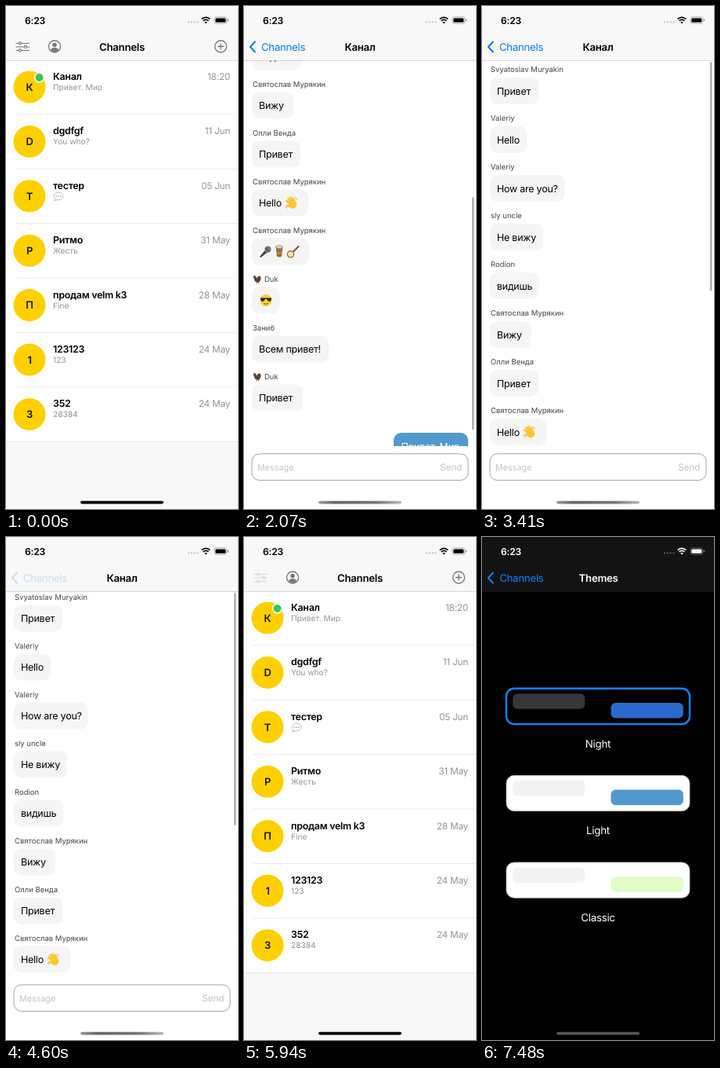
Write an HTML page that moves like this. It is 296 px wide and 640 px high and loops after 8 s.

```html
<!DOCTYPE html>
<html lang="en">
<head>
<meta charset="utf-8">
<title>Messenger</title>
<style>
  html, body { margin: 0; height: 100%; overflow: hidden; background: #fff; }
  svg {
    --fg: #000; --bar: #f8f8f8; --bg: #fff; --blue: #007aff; --dots: #c4c4c6; --line: #c8c8c8;
    display: block; width: 100vw; height: 100vh;
    font-family: Inter, sans-serif; text-rendering: geometricPrecision;
  }
  svg.dark { --fg: #fff; --bar: #131314; --bg: #000; --blue: #0a84ff; --dots: #5a5a5c; --line: #1c1c1e; }
  .card { stroke: #aaa; stroke-width: .8; }
  svg.dark #card0, svg:not(.dark) #card1 { stroke: var(--blue); stroke-width: 2.4; }
</style>
</head>
<body>
<svg id="stage" viewBox="0 0 296 640" preserveAspectRatio="none">
  <defs>
    <clipPath id="view"><rect y="69" width="296" height="491"/></clipPath>
    <linearGradient id="fade">
      <stop stop-color="#999"/><stop offset=".2" stop-color="#666"/>
      <stop offset=".7" stop-color="#777"/><stop offset="1" stop-color="#bbb"/>
    </linearGradient>
  </defs>
  <g id="list"></g>
  <g id="chat"></g>
  <g id="themes"></g>
  <g id="bar"></g>
</svg>
<script>
const $ = id => document.getElementById(id);
const text = (x, y, size, str, fill = 'var(--fg)', attrs = '') =>
  `<text x="${x}" y="${y}" font-size="${size}" fill="${fill}" letter-spacing="${size > 11 ? '-.02em' : 0}" ${attrs}>${str}</text>`;
const rect = (x, y, w, h, r, fill, attrs = '') =>
  `<rect x="${x}" y="${y}" width="${w}" height="${h}" rx="${r}" fill="${fill}" ${attrs}/>`;
const at = (x, y, body) => `<g transform="translate(${x} ${y})">${body}</g>`;
const BOLD = 'font-weight="600"', MID = 'text-anchor="middle"', END = 'text-anchor="end"';

const emoji = {
  hand: `<g transform="rotate(-22)" stroke="#ffc52e" stroke-width="2.7" stroke-linecap="round">
    <path d="M-2 0L-4.5-4.5M0-1L-1.2-6.5M2.5-1L2-6.5M4.6 1L5-4M-2 4L-6 1.5"/><ellipse cx="1.3" cy="2.6" rx="3.6" ry="4" fill="#ffc52e"/></g>
    <path d="M5-7q2 1 2.5 3M-7 4q.5 2 2.5 3" fill="none" stroke="#a99" stroke-width=".8"/>`,
  mic: `<path d="M-7 6.5L1-3 4 0-5.5 7.5Z" fill="#444"/><circle cx="3.5" cy="-3" r="4" fill="#777"/><path d="M.5-4.5l5 5" stroke="#333"/>`,
  drum: `<path d="M-4.5-6L-3 6.5Q0 8 3 6.5L4.5-6Z" fill="#b5803f"/><path d="M-4-2Q0 0 4-2M-3.3 4Q0 6 3.3 4" fill="none" stroke="#654" stroke-width="1.2"/>
    <ellipse cy="-6" rx="4.5" ry="1.8" fill="#eadfc8" stroke="#765" stroke-width=".7"/>`,
  banjo: `<path d="M-3 3L6.5-6.5" stroke="#7a4a22" stroke-width="1.8" stroke-linecap="round"/><circle cx="-3.5" cy="3.3" r="4.2" fill="#f0dfbd" stroke="#9a6a35" stroke-width="1.2"/>`,
  cool: `<circle r="7.5" fill="#ffcc2f"/><path d="M-7.2-3H7.2L6 1Q3 2.5 1-1.5H-1Q-3 2.5-6 1Z" fill="#222"/><path d="M-3 3.8Q0 6 3 3.8" fill="none" stroke="#8a5a10"/>`,
  bird: `<path d="M-5-4Q-2-6-1-1Q2-6 4.5-3Q5 3 1 4.5Q-4 4-4-1Z" fill="#5a4438"/><path d="M-5-3.5l1 3.5M-1 4.5v1.5M1.5 4.5v1.5" stroke="#a65"/>`,
  talk: `<path d="M-4 3.5L-5.5 6-1 4.5" fill="#fff" stroke="#aaa" stroke-width=".7"/><ellipse rx="6" ry="4.8" fill="#fff" stroke="#aaa" stroke-width=".7"/>
    <path d="M-2.8 0h0M0 0h0M2.8 0h0" stroke="#777" stroke-width="1.4" stroke-linecap="round"/>`
};

// Channel list
const ROW = 69.4, GRAY = '#949498';
const channels = [
  ['К', 'Канал', 'Привет. Мир', '18:20'], ['D', 'dgdfgf', 'You who?', '11 Jun'],
  ['Т', 'тестер', '', '05 Jun'], ['Р', 'Ритмо', 'Жесть', '31 May'],
  ['П', 'продам velm k3', 'Fine', '28 May'], ['1', '123123', '123', '24 May'], ['3', '352', '28384', '24 May']
];
$('list').innerHTML = rect(0, 0, 296, 640, 0, '#f8f8f8') + rect(0, 69, 296, 485, 0, '#fff') +
  channels.map(([letter, name, last, date], i) => at(0, 103 + i * ROW,
    '<circle cx="30" r="20.5" fill="#ffd000"/>' +
    text(30, 4.7, 13, letter, '#111', `${BOLD} ${MID}`) +
    text(60, -9, 12.4, name, '#000', BOLD) + text(60, 4, 10.2, last, GRAY) +
    text(286, -9, 11.8, date, GRAY, END) +
    rect(i < 6 ? 12 : 0, 34.5, 296, .6, 0, '#dedede'))).join('') +
  '<circle cx="42.5" cy="91" r="5.7" fill="#34c759" stroke="#fff" stroke-width="1.5"/>' +
  at(67, 242, emoji.talk) + rect(0, 0, 296, 640, 0, '#000', 'id="dim"');

// Conversation: name, text, bubble width, emoji with their x
const friend = 'Святослав Мурякин', birdFan = 'Duk';
const messages = [
  ['Svyatoslav Muryakin', 'Привет', 62], ['Valeriy', 'Hello', 47], ['Valeriy', 'How are you?', 95],
  ['sly uncle', 'Не вижу', 68], ['Rodion', 'видишь', 63], [friend, 'Вижу', 53], ['Олли Венда', 'Привет', 62],
  [friend, 'Hello', 72, { hand: 60 }], [friend, '', 73, { mic: 27, drum: 45, banjo: 63 }], [birdFan, '', 36, { cool: 28 }],
  ['Заниб', 'Всем привет!', 98], [birdFan, 'Привет', 65]
];
const bubbles = messages.map(([name, body, width, icons = {}], i) => {
  const bird = name === birdFan;
  return at(0, -239 + i * 62,
    (bird ? at(17, 0, emoji.bird) : '') + text(bird ? 26 : 11, 3.4, 9.5, name, '#444') +
    rect(10, 10, width, 34, 9.5, '#f5f5f5') + text(19, 31.5, 12.5, body, '#000') +
    Object.entries(icons).map(([kind, x]) => at(x, 27, emoji[kind])).join(''));
}).join('');
$('chat').innerHTML = rect(0, 0, 296, 640, 0, '#fff') +
  `<g clip-path="url(#view)"><g id="scroll">${bubbles}` +
  rect(191, 514.5, 95, 34.5, 9.5, '#5199cf') + text(200.5, 536, 12.5, 'Привет. Мир', '#fff') + '</g></g>' +
  rect(291, 71, 2.4, 296, 1.2, '#aaa', 'id="thumb"') +
  rect(10, 569.8, 276, 33.6, 9.5, '#fff', 'stroke="#999" stroke-width=".9"') +
  text(17, 590.6, 10.8, 'Message', '#c3c3c5') + text(278, 590.8, 11.9, 'Send', '#c6c6c8', END);

// Theme picker
const themes = [
  ['Night', '#000', '#373739', '#2c69cf'], ['Light', '#fff', '#f3f3f3', '#5199cf'], ['Classic', '#fff', '#f3f3f3', '#e1fdc8']
];
$('themes').innerHTML = rect(0, 0, 296, 640, 0, 'var(--bg)') +
  themes.map(([name, back, left, right], i) => at(0, 192 + i * 110.6,
    rect(31, .7, 234, 45.4, 10, back, `id="card${i}" class="card"`) +
    rect(39.3, 7.2, 92, 19.6, 6, left) + rect(164.5, 19, 92.3, 19.6, 6, right) +
    text(148, 75.5, 13.3, name, 'var(--fg)', MID))).join('');

// Navigation bar, status bar and home indicator
const title = (id, str) => text(148, 56.6, 13.2, str, 'var(--fg)', `id="${id}" ${BOLD} ${MID}`);
$('bar').innerHTML = rect(0, 0, 296, 69, 0, 'var(--bar)') + rect(0, 69, 296, .7, 0, 'var(--line)') +
  text(24, 22.5, 12.2, '6:23', 'var(--fg)', BOLD) +
  `<path d="M233 20.5h0M236.8 20.5h0M240.6 20.5h0M244.4 20.5h0" stroke="var(--dots)" stroke-width="2.3" stroke-linecap="round"/>
  <path d="M249.7 16.6Q255 12 260.3 16.6M251.6 18.9Q255 16 258.4 18.9" fill="none" stroke="var(--fg)" stroke-width="1.7"/>
  <path d="M253.2 20.6Q255 19.2 256.8 20.6L255 22.5Z" fill="var(--fg)"/>` +
  rect(265.8, 14, 16, 8.2, 2.6, 'none', 'stroke="var(--fg)" stroke-opacity=".4" stroke-width=".8"') +
  rect(267.2, 15.4, 13.2, 5.4, 1.5, 'var(--fg)') + rect(282.8, 16.6, 1.1, 3, .5, 'var(--fg)', 'opacity=".5"') +
  `<g id="buttons" fill="none" stroke="#77777a" stroke-width="1.1">
    <g id="sliders"><path d="M12.5 47.5H30M12.5 52H30M12.5 56.5H30"/>
      <g fill="var(--bar)"><circle cx="18" cy="47.5" r="1.6"/><circle cx="25" cy="52" r="1.6"/><circle cx="18" cy="56.5" r="1.6"/></g></g>
    <circle cx="62" cy="51.5" r="7.5" stroke-width="1.3"/>
    <g fill="#77777a" stroke="none"><circle cx="62" cy="49.5" r="2.7"/><path d="M57 56.2Q58 53 62 53T67 56.2Q62 60.5 57 56.2Z"/></g>
    <circle cx="274" cy="51.5" r="7.5" stroke-width="1.3"/><path d="M270 51.5h8M274 47.5v8" stroke-width="1.3"/>
  </g>
  <g id="back"><path d="M14 45.5L8 52L14 58.5" fill="none" stroke="var(--blue)" stroke-width="2" stroke-linecap="round" stroke-linejoin="round"/>` +
  text(22, 56.6, 13.2, 'Channels', 'var(--blue)', 'id="backLabel"') + '</g>' +
  title('listTitle', 'Channels') + title('chatTitle', 'Канал') + title('themesTitle', 'Themes') +
  rect(95, 629.8, 106, 3.6, 1.8, '#000', 'id="home"');

const move = (id, x, y = 0) => $(id).setAttribute('transform', `translate(${x} ${y})`);
const fade = (id, v) => $(id).setAttribute('opacity', v);

// Critically damped slide sampled in five steps; it rests just short of the end
function slide(t, first, gap) {
  if (t < first) return 0;
  const w = .016 * (40 + gap * Math.min(4, Math.floor((t - first) / gap)));
  return 1 - Math.exp(-w) * (1 + w);
}

const TOP = 315.5;
const drag = [[0, 4], [6, 151], [10.5, 310], [11.3, 330], [13, 320], [15, 316.5], [17, TOP]];
function scrollAt(t) {
  if (t < 1950) return 0;
  const step = Math.min(17, Math.floor((t - 1950) / 110));
  const i = Math.max(1, drag.findIndex(k => k[0] >= step));
  const [[a, from], [b, to]] = [drag[i - 1], drag[i]];
  return from + (to - from) * (step - a) / (b - a);
}

function render(t) {
  const chat = t < 1950 ? slide(t, 740, 115) : t < 4750 ? 1 : t < 5940 ? 1 - slide(t, 4750, 110) : 0;
  const picker = slide(t, 6130, 110);
  const pushed = Math.max(chat, picker), dark = t >= 7480;

  $('stage').classList.toggle('dark', dark);
  move('list', -88.8 * pushed);
  fade('dim', .1 * pushed);
  move('chat', 296 * (1 - chat));
  move('themes', dark ? 0 : 296 * (1 - picker));

  const s = scrollAt(t);
  move('scroll', 0, s);
  fade('thumb', t < 1950 ? 0 : 1);
  $('thumb').setAttribute('y', 71 + .6 * Math.max(0, TOP - s));
  $('thumb').setAttribute('height', 296 - Math.max(0, s - TOP));

  fade('buttons', Math.max(0, 1 - 1.6 * pushed));
  fade('sliders', t >= 5940 && t < 6570 ? .25 : 1);
  fade('back', pushed * (t >= 4600 && t < 4860 ? .2 : 1));
  move('backLabel', 98 * (1 - pushed));
  move('listTitle', -98 * pushed);
  fade('listTitle', Math.max(0, 1 - 1.3 * pushed));
  move('chatTitle', 148 * (1 - chat));
  fade('chatTitle', chat);
  move('themesTitle', 148 * (1 - picker));
  fade('themesTitle', picker);
  $('home').setAttribute('fill', dark ? '#555' : pushed > .5 ? 'url(#fade)' : '#000');
}

function tick(now) {
  render(now % 8000);
  requestAnimationFrame(tick);
}
render(0);
requestAnimationFrame(tick);
</script>
</body>
</html>
```
